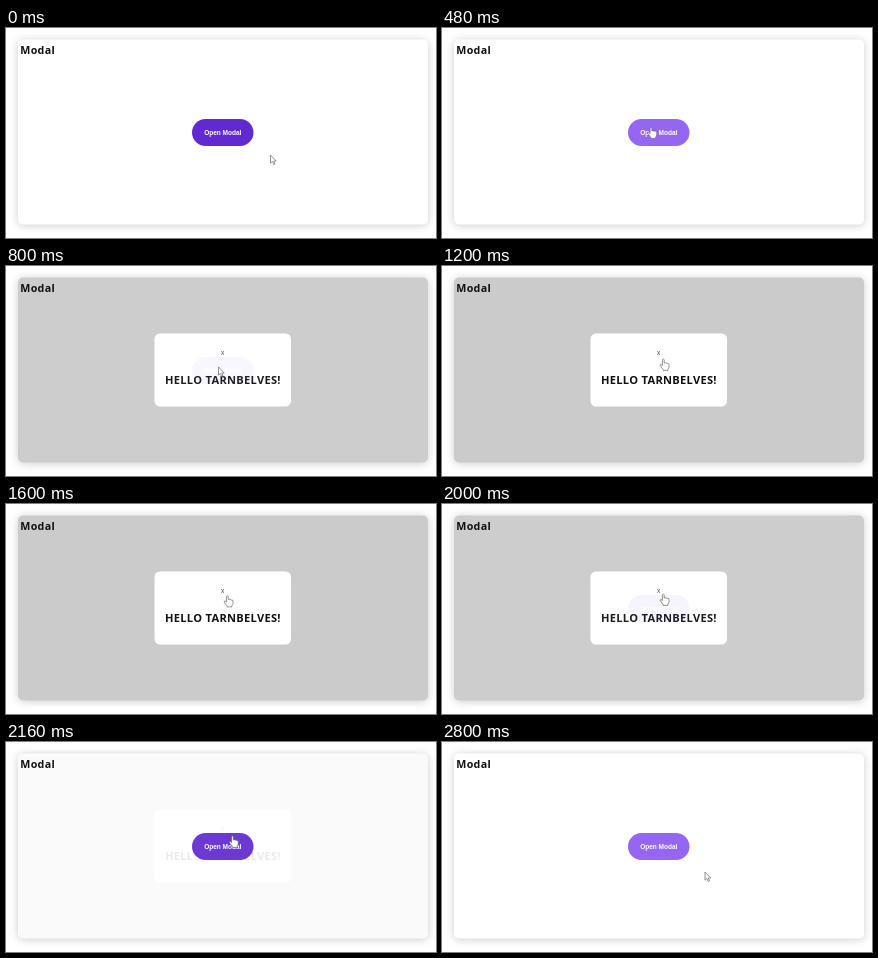
Animation, 430 px wide and 210 px high, one loop 2.88 s. Source, as an HTML page:

```html
<!DOCTYPE html>
<html lang="en">
<head>
<meta charset="utf-8">
<title>Modal</title>
<style>
  html, body { margin: 0; width: 100%; height: 100%; overflow: hidden; background: #fff; }
  svg { display: block; }
  .card { filter: drop-shadow(0 1px 4.5px rgba(0, 0, 0, .2)); }
  .heading { font: bold 10.7px "Open Sans", "Noto Sans", sans-serif; letter-spacing: .3px; fill: #111; }
  .message { font-size: 11.1px; text-anchor: middle; }
  .label, .close { font: 6.5px "Liberation Sans", Arial, sans-serif; text-anchor: middle; }
  .label { font-weight: bold; fill: #fff; }
  .close { fill: #444; }
  .cursor path { fill: #fff; stroke: #666; stroke-width: .7; stroke-linejoin: round; }
</style>
</head>
<body>
<svg width="430" height="210" viewBox="0 0 430 210">
  <mask id="around">
    <rect width="430" height="210" fill="#fff"/>
    <rect x="148.5" y="67.5" width="136.5" height="73" rx="5.5"/>
  </mask>
  <rect class="card" x="12" y="11.5" width="410" height="185" rx="5" fill="#fff"/>
  <rect id="backdrop" x="12" y="11.5" width="410" height="185" rx="5" mask="url(#around)"/>
  <text class="heading" x="14.3" y="26">Modal</text>
  <g id="modal">
    <text class="close" x="216.5" y="88.6">x</text>
    <text class="heading message" x="216.9" y="118">HELLO TARNBELVES!</text>
  </g>
  <g id="button">
    <rect x="186" y="91" width="61.5" height="27" rx="13.5"/>
    <text class="label" x="216.8" y="106.6">Open Modal</text>
  </g>
  <g id="cursor" class="cursor">
    <path id="arrow" d="M0 0V8.2L1.9 6.5L3.2 9.5L4.5 8.9L3.2 6H5.7Z"/>
    <path id="hand" d="M-.9 .7Q0-.5 .9 .7V4Q1.9 3.2 2.6 4.2Q3.7 3.5 4.3 4.6Q5.7 4.1 5.7 5.6V7.8Q5.6 9.3 4.6 10.2V11.4H-.2V10.4L-3 6.8Q-3.5 5.5-2.4 5.4L-.9 6.6Z"/>
  </g>
</svg>
<script>
const LOOP = 2880, STEP = 80, FADE = 230;
const $ = id => document.getElementById(id);

// Places where the cursor pauses or turns: time, x, y.
const stops = [
  [0, 264.5, 127], [480, 209, 99], [800, 212.5, 101], [1200, 221.3, 93],
  [2000, 221.3, 90], [2160, 226.5, 94], [2800, 263, 130]
];

const mix = (a, b, p) => a + (b - a) * p;

function ease(t, start, duration) {
  const p = Math.min(1, Math.max(0, (t - start) / duration));
  return p * p * (3 - 2 * p);
}

function cursorAt(t) {
  let [, x, y] = stops[0];
  for (let i = 1; i < stops.length; i++) {
    const [start] = stops[i - 1], [end, nextX, nextY] = stops[i];
    const p = ease(t, start, end - start);
    x = mix(x, nextX, p);
    y = mix(y, nextY, p);
  }
  return [x, y];
}

function draw(now) {
  const t = Math.floor(now % LOOP / STEP) * STEP;
  const [x, y] = cursorAt(t);
  const open = ease(t, 600, FADE) - ease(t, 1970, FADE);
  const hover = ease(t, 240, 160) - ease(t, 1200, 160) + ease(t, 2160, 160);
  const pointing = open > .5 ? y < 97 : x < 247;

  $("backdrop").setAttribute("opacity", .2 * open);
  $("modal").setAttribute("opacity", open);
  $("button").setAttribute("opacity", 1 - open);
  $("button").setAttribute("fill", `rgb(${mix(96, 148, hover)}, ${mix(42, 102, hover)}, ${mix(208, 242, hover)})`);
  $("cursor").setAttribute("transform", `translate(${x} ${y})`);
  $("arrow").setAttribute("visibility", pointing ? "hidden" : "visible");
  $("hand").setAttribute("visibility", pointing ? "visible" : "hidden");
  requestAnimationFrame(draw);
}
requestAnimationFrame(draw);
</script>
</body>
</html>
```
